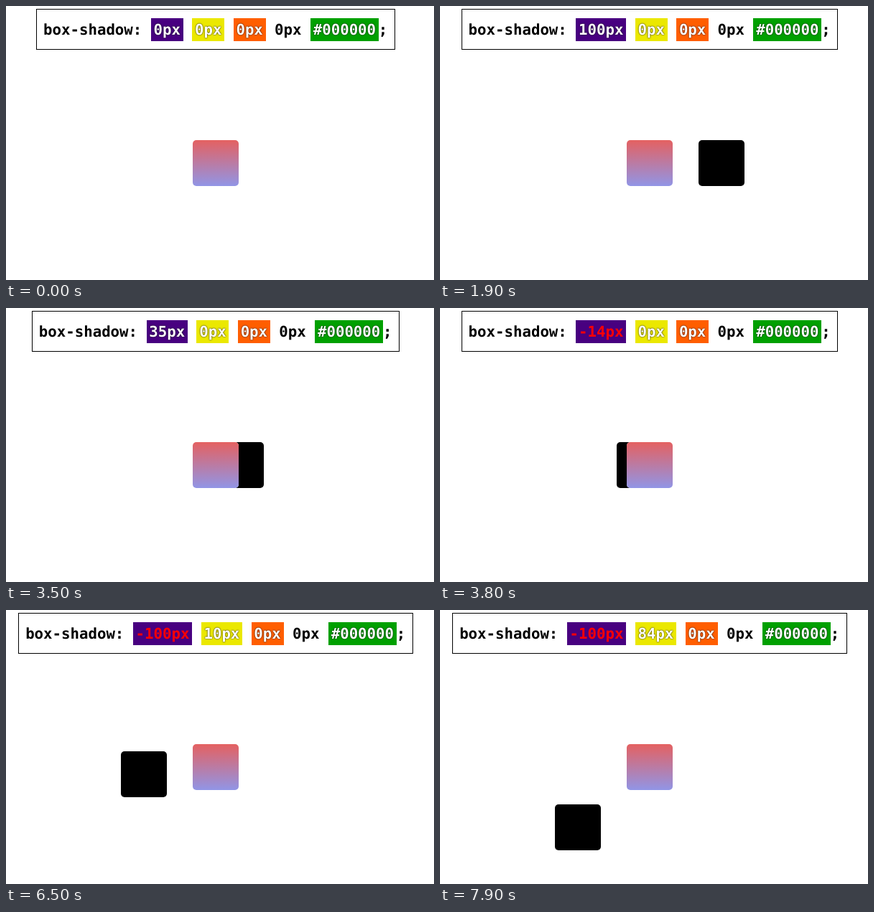
Write an HTML page that moves like this. It is 596 px wide and 382 px high and loops after 8 s.

```html
<!DOCTYPE html>
<html lang="en">
<head>
<meta charset="utf-8">
<title>box-shadow</title>
<style>
  html, body { margin: 0; width: 100%; height: 100%; overflow: hidden; background: #fff; }
  .stage { position: relative; width: 584px; height: 382px; }
  .row { position: absolute; top: 4px; left: 0; right: 0; display: flex; justify-content: center; }
  .rule {
    box-sizing: border-box; flex: none; display: flex; height: 57px;
    padding: 12px 9.7px 12px 9.08px; border: 1px solid #000;
    font: bold 20.73px/32px "DejaVu Sans Mono", monospace;
    text-rendering: geometricPrecision; white-space: pre; color: #000;
  }
  .chip { height: 32px; padding: 0 3.78px; color: #fff; text-shadow: 0 0 2px #000; }
  .x { background: #480080; }
  .y { background: #ebe800; }
  .blur { background: #ff5e00; }
  .color { background: #00a000; }
  .negative { color: #f00; text-shadow: none; }
  .square {
    position: absolute; left: 260px; top: 187px; width: 64px; height: 64px;
    border-radius: 5px; background: linear-gradient(#e46161, #9195e6);
  }
</style>
</head>
<body>
<div class="stage">
  <div class="row">
    <div class="rule"><span>box-shadow: </span><span class="chip x">0px</span><span> </span><span class="chip y">0px</span><span> </span><span class="chip blur">0px</span><span> 0px </span><span class="chip color">#000000</span><span>;</span></div>
  </div>
  <div class="square"></div>
</div>
<script>
  const LOOP = 8000, STEP = 100;
  const xChip = document.querySelector('.x');
  const yChip = document.querySelector('.y');
  const square = document.querySelector('.square');

  // Progress from 0 to 1; powers above 1 soften the start and the end.
  function ramp(t, from, to, easeIn, easeOut) {
    const p = Math.min(1, Math.max(0, (t - from) / (to - from)));
    return 1 - (1 - p ** easeIn) ** easeOut;
  }

  // A one-pixel nudge, a drag to 100, then a drag back to -100.
  function offsetX(t) {
    const nudge = t >= 800 ? 1 : 0;
    return Math.round(nudge + 99 * ramp(t, 900, 1800, 1, 1.26) - 200 * ramp(t, 3000, 4500, 1.34, 1.5));
  }

  function offsetY(t) {
    return Math.round(84 * ramp(t, 6400, 7900, 0.97, 1.65));
  }

  function show(chip, value) {
    chip.textContent = value + 'px';
    chip.classList.toggle('negative', value < 0);
  }

  const start = performance.now();
  let shown = -1;

  function draw() {
    const elapsed = (performance.now() - start) % LOOP;
    const t = Math.floor(elapsed / STEP) * STEP;
    if (t !== shown) {
      shown = t;
      const x = offsetX(t), y = offsetY(t);
      show(xChip, x);
      show(yChip, y);
      square.style.boxShadow = `${x}px ${y}px 0 0 #000`;
    }
    requestAnimationFrame(draw);
  }
  draw();
</script>
</body>
</html>
```
